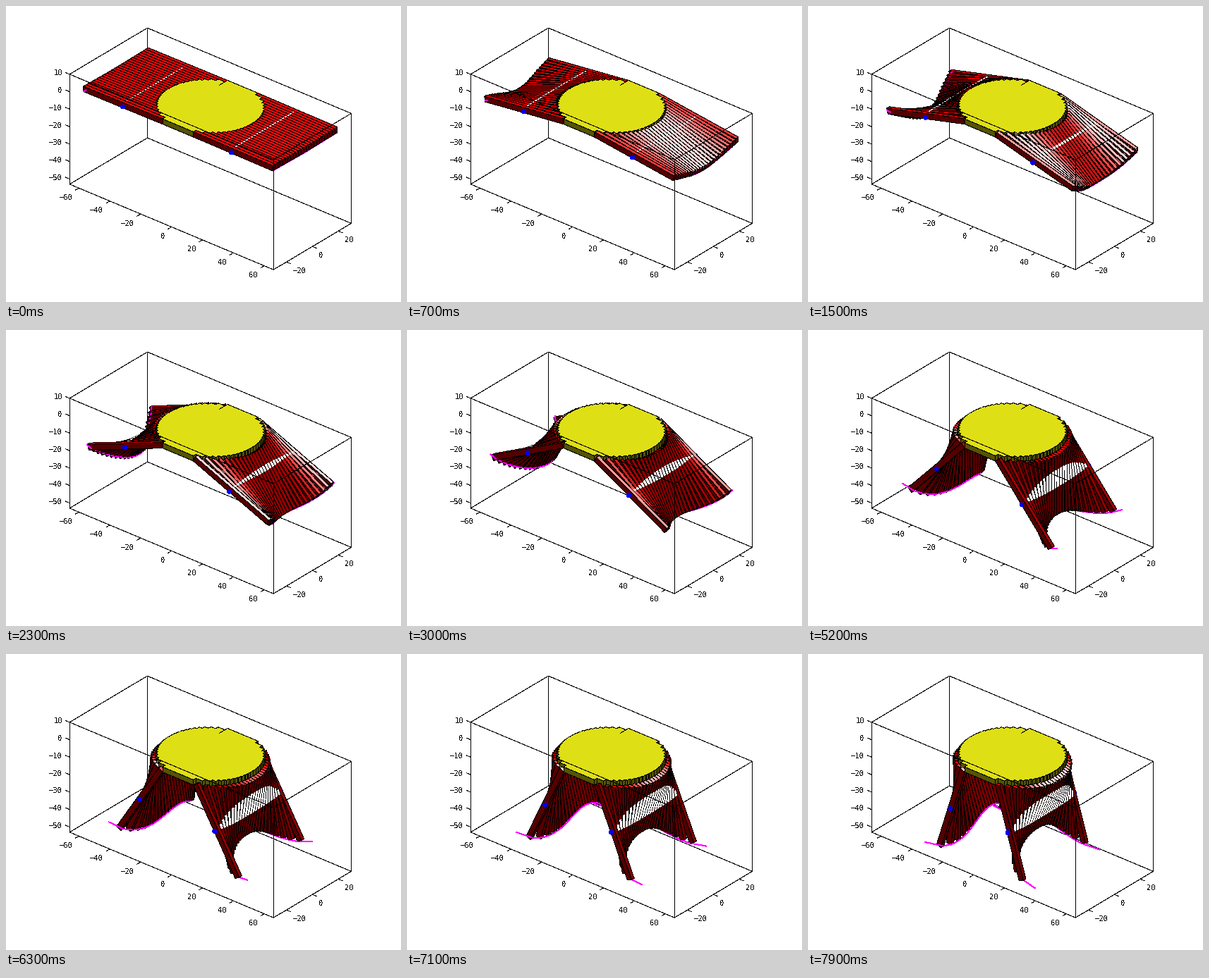
A matplotlib script for the animation above (8 s loop, 560 px wide and 420 px high).

```python
import numpy as np
import matplotlib.pyplot as plt
from matplotlib.animation import FuncAnimation
from matplotlib.collections import PolyCollection

W, H, DPI = 560, 420, 100
PX = 72 / DPI
STEPS, INTERVAL = 80, 100

# Orthographic camera
AZ, EL, ZOOM = np.radians(40), np.radians(30), 2.859
CENTER = np.array([289.8, 149.4])
VIEW = np.array([np.cos(EL) * np.sin(AZ), -np.cos(EL) * np.cos(AZ), np.sin(EL)])
LIGHT = np.array([-0.08, 0.663, 0.745])

# Table dimensions: an elliptic top cut into slats
RX, RY = 26.9, 24.75
DEPTH, HALF, THICK, SLAT = 25.0, 61.2, 3.0, 2.0
EDGES = np.arange(-DEPTH, DEPTH + 1, SLAT)
N = len(EDGES) - 1
REACH = RX * np.sqrt(np.maximum(1 - (EDGES / RY)**2, 0))
HINGE = np.maximum(REACH[:-1], REACH[1:])
ROD_DIST, ROD_H, ROD_END = 25.3, 1.0, 25.7

RED, YELLOW = np.array([1, 0, 0]), np.array([1, 1, 0.05])
BLACK, WHITE, BLUE, MAGENTA = (0, 0, 0, 1), (1, 1, 1, 1), (0, 0, 1, 1), (1, 0, 1, 1)

X0, X1, Y0, Y1, Z0, Z1 = -66, 66, -30, 30, -53, 10
HAIR = 0.02  # aliased fills paint every touched pixel, so this is one pixel


def project(pts):
    x, y, z = np.asarray(pts, float).T
    u = x * np.cos(AZ) + y * np.sin(AZ)
    v = (x * np.sin(AZ) - y * np.cos(AZ)) * np.sin(EL) - z * np.cos(EL)
    return CENTER + ZOOM * np.column_stack([u, v])


def shade(base, normal):
    n = np.asarray(normal, float)
    lit = n @ LIGHT
    color = base * (0.33 + 0.68 * max(lit, 0))
    if lit > 0:
        mirror = 2 * lit * n - LIGHT
        color = color + 0.85 * max(mirror @ VIEW, 0) ** 20
    return (*np.clip(color, 0, 1), 1)


class Painter:
    """Collects filled polygons from back to front."""

    def __init__(self):
        self.polys, self.fills = [], []

    def fill(self, flat, color):
        self.polys.append(flat)
        self.fills.append(color)

    def stroke(self, a, b, color, width):
        d = b - a
        length = np.hypot(*d)
        if length > 0.01:
            off = np.array([-d[1], d[0]]) * (width / 2 / length)
            self.fill(np.array([a + off, b + off, b - off, a - off]), color)

    def line(self, a, b, color=BLACK, width=HAIR):
        self.stroke(*project([a, b]), color, width)

    def face(self, pts, base, normal, outline=True):
        if np.dot(normal, VIEW) <= 0:
            return
        flat = project(pts)
        self.fill(flat, shade(base, normal))
        if outline:
            for a, b in zip(flat, np.roll(flat, -1, axis=0)):
                self.stroke(a, b, BLACK, HAIR)

    def dot(self, p, r=3):
        t = np.arange(8) * np.pi / 4 + np.pi / 8
        self.fill(project([p]) + r * np.column_stack([np.cos(t), np.sin(t)]), BLUE)


def rod_position(angle):
    c, s = np.cos(angle), np.sin(angle)
    return (HINGE[0] + ROD_DIST * c + ROD_H * s, -ROD_DIST * s + ROD_H * c)


def leg_pose(hinge, rod):
    """Leg angle and distance of the rod along the leg."""
    dx, dz = rod[0] - hinge, rod[1]
    r = np.hypot(dx, dz)
    return np.arctan2(-dz, dx) + np.arcsin(ROD_H / r), np.sqrt(r * r - ROD_H**2)


def draw_leg(art, k, side, rod):
    y0, y1, hinge = EDGES[k], EDGES[k + 1], HINGE[k]
    theta, dist = leg_pose(hinge, rod)
    c, s = np.cos(theta), np.sin(theta)
    size = HALF - hinge

    def at(along, up, y):
        return (side * (hinge + along * c + up * s), y, up * c - along * s)

    corners = [(0, 0), (size, 0), (size, THICK), (0, THICK)]
    normals = [(-s, -c), (c, -s), (s, c), (-c, s)]
    for i, (nx, nz) in enumerate(normals):
        a, b = corners[i], corners[(i + 1) % 4]
        quad = [at(*a, y0), at(*b, y0), at(*b, y1), at(*a, y1)]
        art.face(quad, RED, (side * nx, 0, nz))
    art.face([at(*p, y0) for p in corners], RED, (0, -1, 0))

    # Slot uncovered by the sliding rod
    if np.dot((side * s, 0, c), VIEW) > 0:
        start, mid, w = HINGE[0] + ROD_DIST - hinge, (y0 + y1) / 2, 0.5
        slot = [at(start, THICK, mid - w), at(dist, THICK, mid - w),
                at(dist, THICK, mid + w), at(start, THICK, mid + w)]
        art.fill(project(slot), WHITE)


def draw_top(art, k):
    y0, y1, h = EDGES[k], EDGES[k + 1], HINGE[k]
    near = HINGE[k - 1] if k else 0
    far = HINGE[k + 1] if k < N - 1 else 0
    t = THICK
    art.face([(-h, y0, t), (h, y0, t), (h, y1, t), (-h, y1, t)],
             YELLOW, (0, 0, 1), outline=False)
    art.face([(h, y0, 0), (h, y1, 0), (h, y1, t), (h, y0, t)], YELLOW, (1, 0, 0))
    art.line((-h, y0, t), (-h, y1, t))
    if h > near:
        spans = [(-h, -near), (near, h)] if k else [(-h, h)]
        for a, b in spans:
            art.face([(a, y0, 0), (b, y0, 0), (b, y0, t), (a, y0, t)],
                     YELLOW, (0, -1, 0))
    if h > far:
        for side in (-1, 1):
            art.line((side * far, y1, t), (side * h, y1, t))


def tip_point(j, side, rod):
    theta, _ = leg_pose(REACH[j], rod)
    size = HALF - REACH[j]
    return (side * (REACH[j] + size * np.cos(theta)), EDGES[j],
            -size * np.sin(theta))


def paint(angle):
    art = Painter()
    rod = rod_position(angle)
    tips = {s: [tip_point(j, s, rod) for j in range(N + 1)] for s in (-1, 1)}
    for side in (-1, 1):
        art.dot((side * rod[0], ROD_END, rod[1]))
    for k in reversed(range(N)):
        draw_leg(art, k, -1, rod)
        for side in (-1, 1):
            art.line(tips[side][k], tips[side][k + 1], MAGENTA, 1)
        under = leg_pose(HINGE[k], rod)[0] > np.pi / 2
        if under:
            draw_leg(art, k, 1, rod)
        draw_top(art, k)
        if not under:
            draw_leg(art, k, 1, rod)
    art.line((-HINGE[0], 18.5, THICK), (-HINGE[0], DEPTH, THICK))
    for side in (-1, 1):
        art.dot((side * rod[0], -ROD_END, rod[1]))
    return art


fig = plt.figure(figsize=(W / DPI, H / DPI), dpi=DPI, facecolor="white")
ax = fig.add_axes([0, 0, 1, 1])
ax.set_xlim(0, W)
ax.set_ylim(H, 0)
ax.axis("off")


def show(art, zorder):
    layer = PolyCollection(art.polys, facecolors=art.fills, edgecolors="none",
                           linewidths=0, antialiaseds=False, zorder=zorder)
    layer.set_snap(False)
    ax.add_collection(layer, autolim=False)
    return layer


def corner(i, j, k):
    return ((X0, X1)[i], (Y0, Y1)[j], (Z0, Z1)[k])


back, front = Painter(), Painter()
back.line(corner(0, 1, 0), corner(0, 1, 1))
for i, j in ((0, 0), (1, 0), (1, 1)):
    front.line(corner(i, j, 0), corner(i, j, 1))
for k in (0, 1):
    back.line(corner(0, 0, k), corner(0, 1, k))
    back.line(corner(0, 1, k), corner(1, 1, k))
    front.line(corner(0, 0, k), corner(1, 0, k))
    front.line(corner(1, 0, k), corner(1, 1, k))

TICK = 2.8


def tick(start, end, value, dx, dy, ha):
    front.line(start, end)
    u, v = project([start])[0]
    ax.text(u + dx, v + dy, str(value).replace("-", "\u2212"), ha=ha,
            va="center_baseline", fontsize=10.5 * PX,
            family="DejaVu Sans Mono", color="black", antialiased=False)


for x in range(-60, 61, 20):
    tick((x, Y0, Z0), (x, Y0 - TICK, Z0), x, -9, 12.5, "right")
for y in range(-20, 21, 20):
    tick((X1, y, Z0), (X1 + TICK, y, Z0), y, 9, 11.5, "left")
for z in range(-50, 11, 10):
    tick((X0, Y0, z), (X0 - TICK, Y0, z), z, -10, -2.5, "right")

show(back, 1)
model = show(paint(0), 2)
show(front, 3)


def update(i):
    art = paint(np.radians(0.915 * i + 0.4))
    model.set_verts(art.polys)
    model.set_facecolor(art.fills)
    return [model]


anim = FuncAnimation(fig, update, frames=STEPS, interval=INTERVAL,
                     init_func=lambda: update(0), repeat=True, repeat_delay=0)
plt.show()
```
